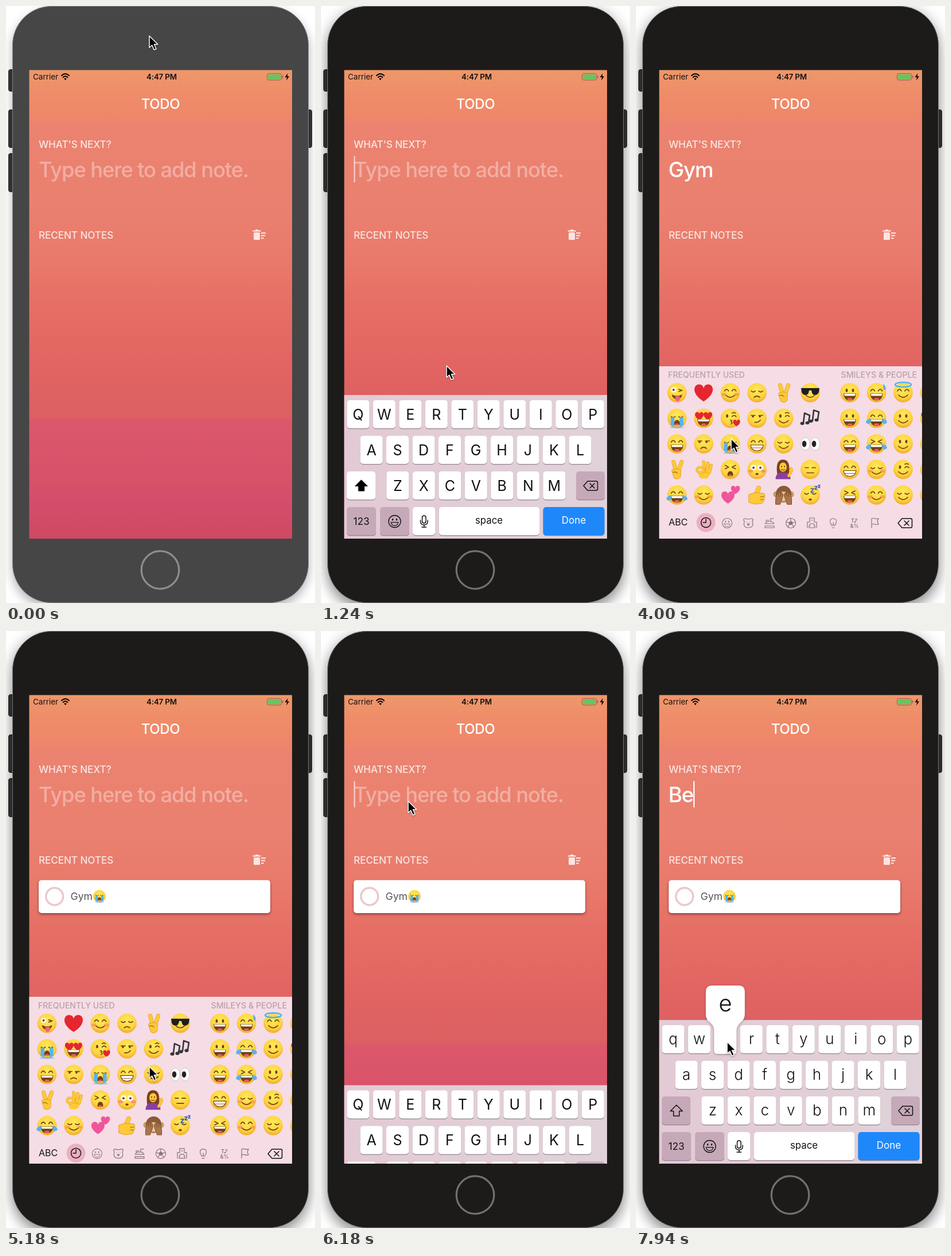
Recreate the animation shown at these times as an HTML page. Size 539x1039 px, loop 8000 ms.

```html
<!DOCTYPE html>
<html lang="en">
<head>
<meta charset="utf-8">
<title>Todo app</title>
<style>
html, body { margin: 0; width: 100%; height: 100%; overflow: hidden; background: #fff; }
#stage { position: relative; width: 539px; height: 1039px; overflow: hidden; }
#body { position: absolute; left: 11px; top: 0; width: 517px; height: 1039px; box-sizing: border-box;
  border: 1px solid #757373; border-radius: 68px; background: #1c1b19;
  box-shadow: 0 12px 22px rgba(0,0,0,.36), 0 0 26px rgba(0,0,0,.16); }
#body.idle { background: #464646; border-color: #858383; box-shadow: 0 8px 18px rgba(0,0,0,.3); }
.btn { position: absolute; width: 10px; box-sizing: border-box; background: #373737; border: 1px solid #2a2a2a; border-radius: 4px; }
svg { position: absolute; left: 0; top: 0; }
text { font-family: Inter, "Liberation Sans", sans-serif; font-optical-sizing: none; white-space: pre; }
#pop path:first-child { filter: drop-shadow(0 1px 2px rgba(70,30,50,.35)); }
</style>
</head>
<body>
<div id="stage">
  <div class="btn" style="left:4px;top:110px;height:39px"></div>
  <div class="btn" style="left:4px;top:180px;height:67px"></div>
  <div class="btn" style="left:4px;top:256px;height:68px"></div>
  <div class="btn" style="left:524px;top:180px;height:67px"></div>
  <div id="body"></div>
  <svg id="art" width="539" height="1039" viewBox="0 0 539 1039"></svg>
</div>
<script>
const LOOP = 8000;
const $ = id => document.getElementById(id);

// ---- markup helpers
const path = (d, fill = 'none', stroke = 'none', w = 1.5) =>
  `<path d="${d}" fill="${fill}" stroke="${stroke}" stroke-width="${w}" stroke-linecap="round" stroke-linejoin="round"/>`;
const rect = (x, y, w, h, r, fill, more = '') =>
  `<rect x="${x}" y="${y}" width="${w}" height="${h}" rx="${r}" fill="${fill}" ${more}/>`;
const oval = (x, y, rx, ry, fill, more = '') =>
  `<ellipse cx="${x}" cy="${y}" rx="${rx}" ry="${ry}" fill="${fill}" ${more}/>`;
const text = (x, y, size, str, fill, { weight = 400, anchor = 'start', gap = 0, id = '' } = {}) =>
  `<text ${id && `id="${id}"`} x="${x}" y="${y}" font-size="${size}" font-weight="${weight}" text-anchor="${anchor}" letter-spacing="${gap}" fill="${fill}">${str}</text>`;
const group = (id, inner, more = '') => `<g id="${id}" ${more}>${inner}</g>`;
const at = (x, y, s, inner) => `<g transform="translate(${x} ${y}) scale(${s})">${inner}</g>`;
const stops = list => list.map(([o, c]) => `<stop offset="${o}" stop-color="${c}"/>`).join('');

// ---- emoji
const BROWN = '#6f4212', RED = '#e5262f', BLUE = '#58b2f0';
const line = (d, w = 1.7) => path(d, 'none', BROWN, w);
const heart = (x, y, s, c = RED) =>
  at(x, y, s, path('M0 9.500C-14 1-11-9-5-9Q-1-9 0-5Q1-9 5-9C11-9 14 1 0 9.500z', c));
const eyeball = (x, y, r, p) => oval(x, y, r, r, '#fff') + oval(x, y, p, p, BROWN);
const cheeks = (c, o) => oval(-11, 3, 4, 2.800, c, `opacity="${o}"`) + oval(11, 3, 4, 2.800, c, `opacity="${o}"`);
const parts = {
  dot: oval(-5.500, -4, 1.900, 3, BROWN) + oval(5.500, -4, 1.900, 3, BROWN),
  happy: line('M-10-3q3.500-6 7 0M3-3q3.500-6 7 0'),
  shut: line('M-10-3q3.500 3.500 7 0M3-3q3.500 3.500 7 0'),
  wink: oval(-5.500, -4, 1.900, 3, BROWN) + line('M3-3q3.500-4 7 0M3-9q3-2 6 0'),
  crazy: eyeball(-6, -5, 4.500, 2) + line('M3-6l6 2-6 2'),
  love: heart(-7.500, -4, .75) + heart(7.500, -4, .75),
  wide: eyeball(-6, -3, 5, 2) + eyeball(6, -3, 5, 2),
  line: line('M-9-3h6M3-3h6'),
  squint: line('M-9-7l6 3-6 3M9-7l-6 3 6 3'),
  side: line('M-10-5h7M3-5h7') + oval(-7, -3, 1.800, 1.800, BROWN) + oval(5, -3, 1.800, 1.800, BROWN),
  shades: path('M-16-8h32l-1 7q-2 5-7 5t-6-8h-4q-1 8-6 8t-7-5z', '#1d1d20'),
  grin: path('M-11 1.500h22q-1 12-11 12t-11-12z', BROWN) + path('M-10 2h20l-1 3.500h-18z', '#fff') + oval(0, 11, 4.500, 2, '#ef5a68'),
  teeth: path('M-11 2h22q-1 10-11 10t-11-10z', '#fff', BROWN, 1.200) + line('M-9.500 7h19', .8),
  smile: line('M-8 4q8 8 16 0'),
  smirk: line('M-4 7q6 1 10-4'),
  flat: line('M-6 6h12'),
  sad: line('M-5 8q5-4 10 0'),
  oh: oval(0, 8, 2.800, 1.800, BROWN),
  wail: path('M-5 11q0-8 5-8t5 8q-5 2-10 0z', BROWN) + oval(0, 10.500, 3, 1.500, '#ef5a68'),
  lick: path('M-9 3q9 5 18 0q-1 8-9 8t-9-8z', BROWN) + path('M-3 6h8v6q-4 6-8 0z', '#f0607a'),
  kiss: line('M0 3q5 1 1 3q5 2 0 4', 1.500) + heart(11, 8, .62),
  tears: path('M-11-2h6.500v16q-4 1-6.500-2zM4.500-2h6.500v14q-2.500 3-6.500 2z', BLUE) + oval(0, 16, 13, 1.500, BLUE, 'opacity=".6"'),
  joy: path('M-10 0q-10 3-8 8q5 4 8-1zM10 0q10 3 8 8q-5 4-8-1z', BLUE),
  sweat: path('M12-16q7 9 3 11t-3-11z', BLUE),
  halo: oval(0, -14, 14, 4, 'none', 'stroke="#4bb4ec" stroke-width="2.500"'),
  blush: cheeks('#f58a55', .65),
  flush: cheeks('#f2707a', .6),
  zzz: path('M1-11h5l-5 6h5M8-15h4l-4 5h4M14-17h3l-3 4h3', 'none', '#3557c4', 1.700)
};
const HAND = '#fdc936', SHADE = '#dd9420';
const finger = (d, w = 6) => path(d, 'none', SHADE, w + 1) + path(d, 'none', HAND, w);
const things = {
  heart: heart(0, 0, 1.600),
  hearts: heart(-4, 4, 1.150, '#f0559b') + heart(9, -9, .78, '#f0559b'),
  peace: finger('M-2 2L-6-13M3 2L8-13') + path('M-9 1q9-5 16 1l-1 12q-6 5-11 1z', HAND, SHADE, .8) + line('M-7 5q5-2 8 2', 1),
  ok: path('M-3 2q8-5 14 2q0 8-6 12h-9q-5-3-5-8z', HAND) + finger('M1 3L0-13M6 3L7-11M10 5L13-7', 4.500) +
    oval(-6, 1, 5.500, 4.500, 'none', `stroke="${SHADE}" stroke-width="4.500"`) + oval(-6, 1, 5.500, 4.500, 'none', `stroke="${HAND}" stroke-width="3.500"`),
  thumb: finger('M-2 0L3-12', 7) + path('M-14-1l10-3 16 1q3 3 1 6q2 3-1 5q0 5-4 7l-12 1-10-3z', HAND, SHADE, .8) + line('M6 3h6M6 8h5', .8),
  notes: path('M-12 8l2-17 9 4-2 12M4 4l2-18 9 3-2 13', 'none', '#33363c', 2.600) +
    [[-14, 9], [-5, 8], [1, 5], [11, 3]].map(p => oval(...p, 3.500, 2.800, '#33363c')).join(''),
  eyes: [-8.500, 8.500].map(x => oval(x, 0, 7.800, 11, '#fff', 'stroke="#bbb" stroke-width=".8"') + oval(x - 2, 0, 3.800, 5.500, '#27211f')).join(''),
  woman: path('M-11 9q-4-26 10-26t10 26z', '#7a3f1e') + path('M-14 17q0-12 13-12t13 12z', '#8a3fa0') + oval(-1, -4, 6.500, 8, HAND) +
    finger('M9 11l5-9l-1-3', 4) + line('M-4 0q3 2 6 0', 1.200) + oval(-3.500, -5, 1, 1.300, BROWN) + oval(1.500, -5, 1, 1.300, BROWN),
  monkey: oval(-14, -1, 4, 5, '#c9966b') + oval(14, -1, 4, 5, '#c9966b') + oval(0, -2, 13.500, 14, '#8a5a35') + oval(0, 4, 10.500, 10, '#e9bf94') +
    path('M-14 16q-1-18 6-21q7 0 7 6l-5 15zM14 16q1-18-6-21q-7 0-7 6l5 15z', '#a8754c', '#7a4e2a', 1) + line('M-9-3l1 6M-5-4v6M9-3l-1 6M5-4v6', .8) + line('M-3 11q3 2 6 0', 1.200)
};
const emoji = (spec, x, y, s = 1) => at(x, y, s, things[spec] ||
  oval(0, 0, 16.800, 16.800, 'url(#skin)') + spec.split('/').map(k => parts[k]).join(''));
const CRY = 'shut/tears/wail';
const emojiRows = [
  'crazy/lick heart happy/smile/blush shut/sad peace shades/smile dot/grin happy/grin/sweat happy/smile/halo dot/grin',
  CRY + ' love/grin wink/kiss side/smirk wink/smile notes dot/grin happy/grin/joy dot/smile love/smile',
  `happy/grin side/sad ${CRY} happy/teeth shut/smile eyes happy/grin squint/grin/joy dot/smile dot/smile`,
  'peace ok squint/wail wide/oh/flush woman line/flat happy/teeth shut/smile/blush wink/smile dot/smile',
  'happy/grin/joy shut/smile/blush hearts thumb monkey shut/oh/zzz squint/grin happy/smile/blush shut/smile happy/grin'
];
const emojiX = i => i < 6 ? 71.500 + 46.500 * i : 373 + 46.500 * (i - 6);

// ---- keyboards
const DARK = '#111', GREYKEY = '#c6a9b8';
const key = (x, y, w, fill = '#fff') => rect(x, y + 1.200, w, 49, 5, '#948590') + rect(x, y, w, 49, 5, fill);
const rows = [['qwertyuiop', 64.800, 686], ['asdfghjkl', 88, 748], ['zxcvbnm', 133.800, 810]];
const keyPos = {};
rows.forEach(([s, x, y]) => [...s].forEach((c, i) => keyPos[c] = [x + 45.500 * i, y + 25]));
const labels = up => Object.entries(keyPos).map(([c, [x, y]]) =>
  text(x, y + (up ? 9 : 7.500), up ? 25 : 26, up ? c.toUpperCase() : c, DARK, { anchor: 'middle', weight: up ? 400 : 350 })).join('');
const ARROW = 'M70.500 825l10.500 10.500h-5.500v8.500h-10v-8.500h-5.500z';
const erase = (x, y) => at(x, y, 1, path('M-12 0l7-8h15q2.500 0 2.500 2.500v11q0 2.500-2.500 2.500h-15zM-1-4l8 8M7-4l-8 8', 'none', DARK, 1.500));
const smiley = (x, y, r, c, w) => at(x, y, r / 10, oval(0, 0, 10, 10, 'none', `stroke="${c}" stroke-width="${w}"`) +
  oval(-3.300, -3, 1.200, 1.700, c) + oval(3.300, -3, 1.200, 1.700, c) + path('M-6 1.500h12q-1 5.500-6 5.500t-6-5.500z', 'none', c, w * .85));

const letterBoard = rect(40, 677, 459, 250, 0, 'url(#board)') +
  Object.values(keyPos).map(([x, y]) => key(x - 19.500, y - 25, 39)).join('') +
  key(445, 810, 50, GREYKEY) + erase(470, 835) +
  key(45, 872, 51, GREYKEY) + text(70.500, 903, 17, '123', DARK, { anchor: 'middle' }) +
  key(103, 872, 51, GREYKEY) + smiley(128.500, 897, 10.500, DARK, 1.300) +
  key(160, 872, 39) + rect(176.500, 887, 6.500, 13, 3.200, 'none', `stroke="${DARK}" stroke-width="1.500"`) +
  path('M173.500 895v2q0 6 6.300 6t6.300-6v-2M179.800 903v4M176 907h7.500', 'none', DARK, 1.500) +
  key(206, 872, 175) + text(293, 901, 16.800, 'space', DARK, { anchor: 'middle' }) +
  key(387.500, 872, 107, '#1e88fb') + text(441, 901, 17, 'Done', '#fff', { anchor: 'middle' }) +
  group('upper', key(45, 810, 50) + path(ARROW, '#000', '#000', 1) + labels(true)) +
  group('lower', key(45, 810, 50, GREYKEY) + path(ARROW, 'none', DARK, 1.500) + labels(false));

const GREY = '#85757e';
const icon = (x, d) => at(x, 900, 1, path(d, 'none', GREY, 1.200));
const tabs = [
  smiley(159, 900, 8.500, GREY, 1.300),
  icon(196, 'M-7-3q-3-5 1-5q3 0 3 1h6q0-1 3-1q4 0 1 5q3 11-7 11t-7-11zM-2 2q2-2 4 0l-2 2zM-3-2v.100M3-2v.100'),
  icon(233, 'M-8 1h16M-8 8h16v-3h-16zM-7 1q0-4 7-4t7 4M2-4v-4h5M-6-3v-2h5'),
  oval(270, 900, 8.500, 8.500, 'none', `stroke="${GREY}" stroke-width="1.200"`) + at(270, 900, 1, path('M0-4l4 3-1.500 4h-5l-1.500-4z', GREY)) +
    icon(270, 'M0-8v4M8-2l-4 1M5 7l-2-4M-5 7l2-4M-8-2l4 1'),
  icon(307, 'M-8 8v-10h4v-7h8v7h4v10M-5 8v-3l2-4h6l2 4v3zM-1-5h2M-3 5h.100M3 5h.100'),
  icon(344, 'M-3 4q0-2-2-4q-2-8 5-8t5 8q-2 2-2 4zM-2 8h4M0 4v-5'),
  text(381, 899, 9, 'T♪', GREY, { anchor: 'middle', weight: 600 }) + text(381, 908, 9, '&amp;%', GREY, { anchor: 'middle', weight: 600 }),
  icon(417, 'M-6 8v-16q4-1 6 0t6 0l-2 5 2 5q-4 1-6 0t-6 0')
].join('');
const emojiBoard = rect(40, 627, 459, 300, 0, '#f6dce5') +
  text(56, 647, 14, 'FREQUENTLY USED', '#b5a2ab', { weight: 500 }) +
  text(357.500, 647, 14.200, 'SMILEYS &amp; PEOPLE', '#b5a2ab', { weight: 500 }) +
  emojiRows.map((r, j) => r.split(' ').map((e, i) => emoji(e, emojiX(i), 673 + 44.500 * j)).join('')).join('') +
  text(57, 904, 16, 'ABC', DARK) + oval(122, 899, 16.500, 16.500, '#ebb0c0') +
  oval(122, 899, 8.500, 8.500, 'none', `stroke="${DARK}" stroke-width="1.500"`) + path('M122 893v6h-5', 'none', DARK) +
  tabs + erase(469, 900);

// ---- screen
const SOFT = 'rgba(255,255,255,.8)';
const statusBar = text(47, 128, 13.500, 'Carrier', '#111') +
  text(271.500, 128, 13.400, '4:47 PM', '#111', { weight: 600, anchor: 'middle', gap: -.2 }) +
  path('M97 121q6.500-6 13 0M99.700 124q3.800-3.400 7.600 0', 'none', '#000', 2) + path('M103.500 129l-2.300-2.700q2.300-1.800 4.600 0z', '#000') +
  rect(455.500, 117.500, 25, 11.500, 3, 'none', 'stroke="#a4595a"') + rect(457, 119, 22, 8.500, 1.500, '#65c65f') +
  path('M482.500 121.500v3.500', 'none', '#a4595a') + path('M491.500 117l-5 7h3.500l-1 5.500 5-7h-3.500z', '#000');
const trash = rect(432, 394, 11, 13, 1.500, SOFT) + rect(430.500, 390.500, 14, 2.200, 0, SOFT) + rect(435, 389, 5, 2, 0, SOFT) +
  rect(445, 394, 8, 2.200, 0, SOFT) + rect(445, 398.500, 7, 2.200, 0, SOFT) + rect(445, 403, 4.500, 2.200, 0, SOFT);
const card = rect(57, 433.500, 404, 57.500, 5, '#fff', 'style="filter:drop-shadow(0 2px 2px rgba(70,20,35,.6))"') +
  oval(84.700, 462, 15, 15, 'none', 'stroke="#ebc8ca" stroke-width="3.500"') +
  text(112.500, 468, 17.600, 'Gym', '#555') + emoji(CRY, 163, 461.500, .64);
const BIG = { weight: 500, gap: -1.150 }, LABEL = { weight: 450, gap: -.120 };
const screen = rect(40, 111, 459, 816, 0, 'url(#sky)') + statusBar +
  text(269.500, 179, 24, 'TODO', '#fff', { weight: 500, anchor: 'middle', gap: -.4 }) +
  text(57, 246.500, 17.200, "WHAT'S NEXT?", SOFT, LABEL) +
  text(57, 404.500, 17.200, 'RECENT NOTES', SOFT, LABEL) + trash +
  text(57, 297.800, 36.400, 'Type here to add note.', 'rgba(255,255,255,.36)', { ...BIG, id: 'hint' }) +
  text(56.500, 297.800, 36.800, '', '#fff', { ...BIG, id: 'note' }) +
  group('noteCry', emoji(CRY, 156, 285, 1.150)) +
  rect(0, 261, 2.200, 46, 1, '#fff', 'id="caret"') + group('card', card);

const BALLOON = 'M-34-83q0-11 11-11h46q11 0 11 11v39q0 8-7 14t-7.500 14V20q0 5-5 5h-29q-5 0-5-5V-16q0-8-7.500-14t-7-14z';
const popup = path(BALLOON, '#fff') + text(0, -49, 40, '', DARK, { anchor: 'middle', weight: 350, id: 'popText' }) +
  group('popCry', emoji(CRY, 0, -62, 1.500));

$('art').innerHTML = `<defs>
  <linearGradient id="sky" x1="0" y1="0" x2="0" y2="1">${stops([[0, '#ee976a'], [.06, '#ef8b69'], [.1, '#ee8769'], [.12, '#eb8370'],
    [.3, '#ea806f'], [.4, '#e97a6b'], [.5, '#e66f65'], [.62, '#e26562'], [.743, '#dc5f61'], [.744, '#dc586b'], [.88, '#d75168'], [.92, '#d54d6c'], [1, '#cf4961']])}</linearGradient>
  <linearGradient id="board">${stops([[0, '#e3cad5'], [1, '#e0d2d9']])}</linearGradient>
  <radialGradient id="skin" cx=".5" cy=".35" r=".68">${stops([[0, '#ffe95c'], [.65, '#fed33f'], [1, '#f0a42a']])}</radialGradient>
  <clipPath id="clip"><rect x="40.500" y="111.500" width="458.500" height="815.500"/></clipPath></defs>
  <g clip-path="url(#clip)">${screen}${group('letters', letterBoard)}${group('emojis', emojiBoard)}${group('pop', popup)}</g>
  <circle id="home" cx="269" cy="981.500" r="32.800" fill="none" stroke-width="3.200"/>
  ${group('pointer', path('M0 0V20.500l4.700-4.300 3.500 8.200 3.800-1.600-3.500-8h6.300z', '#000', '#fff', 1.500), 'style="filter:drop-shadow(0 1px 1px rgba(0,0,0,.35))"')}`;

// ---- timeline
const moves = [ // time, x, y of the pointer tip
  [120, 250, 52], [650, 138, 290], [950, 138, 290], [1240, 219, 626], [1560, 268, 774], [1800, 268, 774],
  [2040, 290, 716], [2180, 290, 716], [2410, 381, 822], [2470, 381, 822], [2570, 404, 836], [2730, 404, 836],
  [3240, 126, 895], [3560, 126, 895], [4000, 166, 753], [4180, 166, 761], [4760, 166, 761], [4940, 250, 758],
  [5250, 250, 758], [5710, 158, 309], [5880, 152, 296], [6180, 152, 296], [6640, 262, 740], [6820, 262, 740],
  [7020, 314, 836], [7190, 314, 836], [7590, 157, 717], [7650, 159, 715]
];
const typed = [[0, '', 57.300], [1740, 'G', 85], [2110, 'Gy', 103], [2650, 'Gym', 135.500], [4280, 'Gym', 179], [5150, '', 57.300], [7110, 'B', 82], [7850, 'Be', 100]];
const taps = [[1690, 1790, 'g'], [2060, 2160, 'y'], [2600, 2700, 'm'], [4240, 4390, '*'], [7060, 7160, 'b'], [7820, 8000, 'e']];
const blinks = [[860, 1500], [1700, 3560], [4260, 4880], [6120, 6520], [6880, 7500], [7640, 8200]];

const clamp = v => Math.min(1, Math.max(0, v));
const show = (id, on) => $(id).style.display = on ? '' : 'none';
const place = (id, x, y, s = 1) => $(id).setAttribute('transform', `translate(${x} ${y}) scale(${s})`);
const within = (t, a, b) => t >= a && t < b;
const rise = (t, start, ms) => 1 - (1 - clamp((t - start) / ms)) ** 3;

function pointerAt(t) {
  const i = moves.findIndex(m => m[0] > t);
  if (i === 0) return moves[0].slice(1);
  if (i < 0) return moves.at(-1).slice(1);
  const [a, b] = [moves[i - 1], moves[i]];
  const k = (t - a[0]) / (b[0] - a[0]), e = k * k * (3 - 2 * k);
  return [a[1] + (b[1] - a[1]) * e, a[2] + (b[2] - a[2]) * e];
}

function draw(t) {
  const idle = t < 120;
  $('body').className = idle ? 'idle' : '';
  $('home').setAttribute('stroke', idle ? '#938b8c' : '#737071');
  place('pointer', ...pointerAt(t));

  const [, note, caretX] = typed.findLast(s => s[0] <= t);
  $('note').textContent = note;
  show('hint', !note);
  show('noteCry', within(t, 4280, 5150));
  show('card', t >= 5180);
  const blink = blinks.find(b => within(t, ...b));
  $('caret').setAttribute('x', caretX);
  $('caret').setAttribute('opacity', blink ? clamp((blink[1] - t) / 120) * (note ? 1 : .65) : 0);

  show('letters', within(t, 860, 3470) || t >= 6100);
  place('letters', 0, 250 * (1 - rise(t, t < 5000 ? 860 : 6100, 350)));
  show('emojis', within(t, 3470, 5500));
  place('emojis', 0, 300 * clamp((t - 5120) / 340) ** 2);
  const lower = within(t, 1800, 5000) || t >= 7170;
  show('lower', lower);
  show('upper', !lower);

  const tap = taps.find(p => within(t, p[0], p[1]));
  show('pop', tap);
  if (tap) {
    const k = tap[2], cry = k === '*';
    show('popCry', cry);
    $('popText').textContent = cry ? '' : lower ? k : k.toUpperCase();
    if (cry) place('pop', 164.500, 762, 1.060);
    else place('pop', ...keyPos[k]);
  }
}

function tick() {
  draw(performance.now() % LOOP);
  requestAnimationFrame(tick);
}
tick();
</script>
</body>
</html>
```
